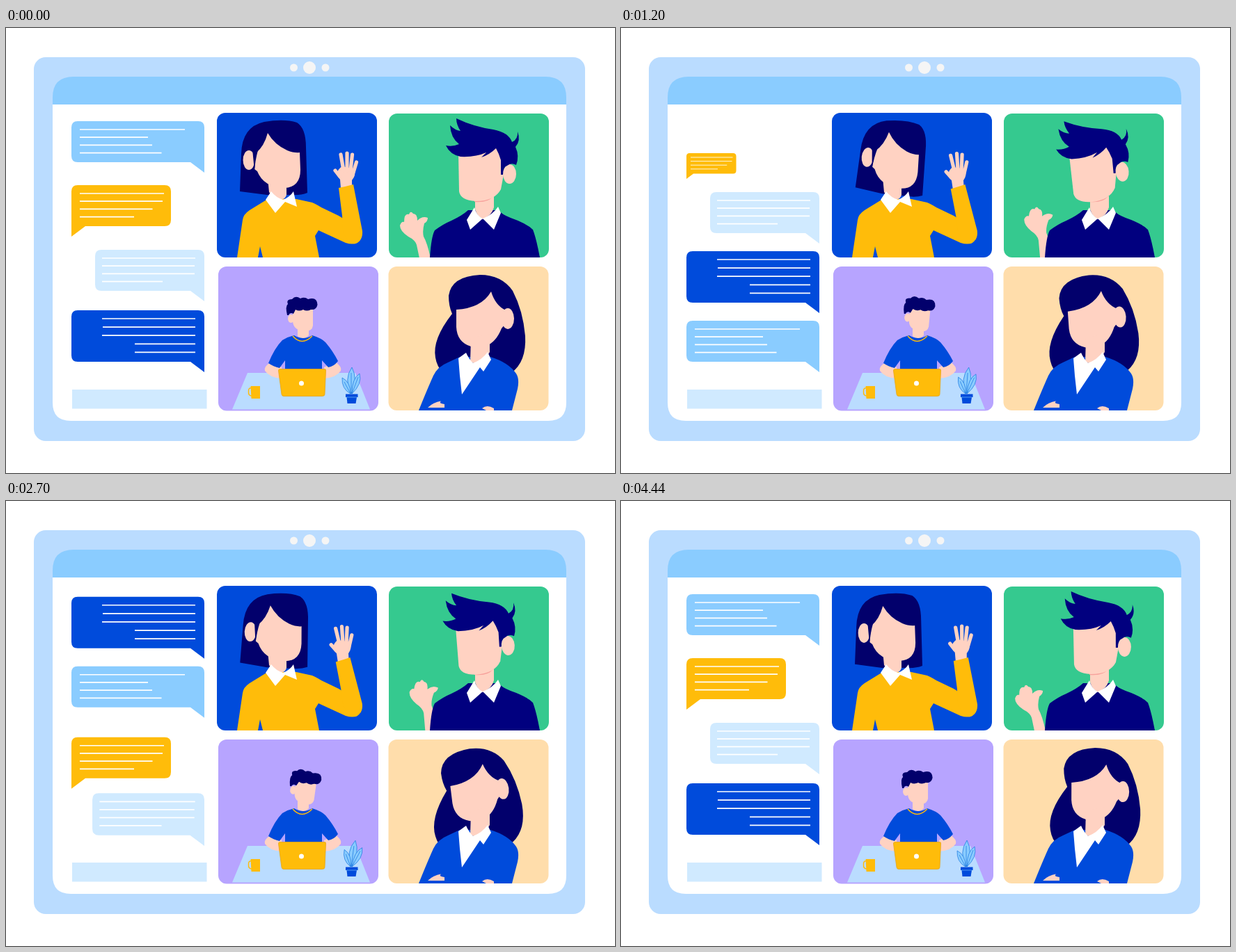
An HTML page that plays this animation: 875x640 px, repeating every 4500 ms.

```html
<!DOCTYPE html>
<html lang="en">
<head>
<meta charset="utf-8">
<title>Video call</title>
<style>
  html, body { margin: 0; width: 100%; height: 100%; overflow: hidden; background: #fff; }
  svg { display: block; width: 875px; height: 640px; }
  .skin { fill: #ffd2c2; }
  .hair { fill: #02006c; }
  .navy { fill: #01007f; }
  .blue { fill: #004bdb; }
  .gold { fill: #ffbc0a; }
  .sky { fill: #8accff; }
  .ice { fill: #badcff; }
  .pale { fill: #d0eaff; }
  .white { fill: #fff; }
  .line { fill: none; }
</style>
</head>
<body>
<svg viewBox="0 0 875 640">
  <clipPath id="topRow"><path d="M0 0H875V330H0Z"/></clipPath>

  <!-- Device -->
  <rect class="ice" x="40" y="42" width="792" height="552" rx="17"/>
  <path class="white" d="M67 109H805V539Q805 565 779 565H93Q67 565 67 539Z"/>
  <path class="sky" d="M67 110V100Q67 70 97 70H775Q805 70 805 100V110Z"/>
  <g fill="#f5f5f5"><circle cx="413.5" cy="57" r="5.5"/><circle cx="436" cy="57" r="9"/><circle cx="459" cy="57" r="5.5"/></g>
  <rect class="pale" x="95" y="520" width="193.5" height="27.5"/>
  <g id="chat"></g>

  <!-- Waving woman -->
  <rect class="blue" x="303" y="122" width="230" height="208" rx="12"/>
  <g id="waver">
    <path class="hair" d="M336 235L338 181Q339 142 371 135Q400 130 418 136Q431 144 431 172L433 237Q423 241 408 240L375 240Z"/>
    <path class="skin" d="M376 151Q386 168 404 176Q414 180 422 179L423 204Q423 229 400 230Q370 229 361 206L357 203L359 180Q371 170 376 151Z"/>
    <ellipse class="skin" cx="349" cy="190" rx="8.5" ry="14"/>
    <path class="hair" d="M354 174L362 176Q358 190 357 206Z"/>
  </g>
  <path class="gold" d="M332 330L340 276Q341 268 350 262L376 246H417L440 251Q447 254 453 258L478 270L510 290Q513 302 505 309Q498 312 488 309L449 291L444 299L450 330H369L365 314L362 330Z"/>
  <path class="skin" d="M376 215H403V240Q401 247 394 247Q383 244 378 236Z"/>
  <path class="white" d="M373 247L381 235Q388 244 398 247Q408 243 413 235L418 257L401 250L387 266Z"/>
  <g id="wave">
    <path class="skin" d="M481 230L480 218L475 211Q477 202 483 199L501 203Q503 212 497 219V228Z"/>
    <path class="line" stroke="#ffd2c2" stroke-width="5.2" stroke-linecap="round" d="M473 205L480 214M481 182L485 205M490 180V205M497.500 182L495 205M503.500 193L499 208"/>
    <path class="gold" d="M478 230Q488 228 499 225L512 292Q513 306 502 310Q490 312 484 290L483 270Z"/>
  </g>

  <!-- Man in navy -->
  <rect fill="#35c98f" x="550" y="123" width="230" height="207" rx="12"/>
  <g clip-path="url(#topRow)">
    <path id="thumb" class="skin" d="M598 350L590 312Q588 305 578 300Q566 292 566 284Q568 278 572 279Q572 266 579 268Q581 262 585 267Q591 267 591 277Q598 270 606 273Q606 278 601 281Q598 292 600 300Q607 312 614 350Z"/>
  </g>
  <path class="navy" d="M609 330Q611 300 616 291Q628 282 640 277Q655 270 664 262H708Q712 268 725 273Q748 281 757 290Q762 303 767 330Z"/>
  <path class="skin" d="M674 242H701V258Q698 270 685 275Q676 270 674 260Z"/>
  <path class="white" d="M662 276L673 258Q676 270 685 274L667 290ZM685 274Q700 268 707 257L711 266L701 290Z"/>
  <path fill="#f7a09b" d="M673 245L700 242Q692 252 673 250Z"/>
  <g id="nodder">
    <path class="skin" d="M650 180L651 235Q653 248 675 249Q702 249 711 232L716 205L708 172Z"/>
    <ellipse class="skin" cx="723.5" cy="210" rx="9.500" ry="14"/>
    <path class="navy" d="M647 130Q672 142 700 146Q722 150 727 164Q736 160 735 149Q740 162 732 171Q738 184 733 197Q726 193 720 198Q714 200 714 211H711V190Q708 180 704 173Q695 182 683 186L690 179Q675 186 653 185Q638 182 632 169Q642 171 651 167Q639 158 638 140Q645 147 653 148Q647 139 647 130Z"/>
  </g>

  <!-- Man at the desk -->
  <rect fill="#b7a4ff" x="305" y="343" width="230" height="207.500" rx="12"/>
  <path class="ice" d="M347 496H502L523 548.500H325Z"/>
  <g class="skin"><path d="M380 481Q370 487 372 493Q379 503 396 504V488Z"/><path d="M473 480Q483 487 481 493Q474 503 457 504V488Z"/></g>
  <path class="skin" d="M419 428H435V442Q427 450 419 443Z"/>
  <path class="blue" d="M414 442Q427 450 440 442Q453 446 459 452Q470 465 477 479Q471 487 463 488L454 478V491H401V478L393 489Q384 487 377 482Q386 460 397 449Q405 444 414 442Z"/>
  <path class="line" stroke="#ffbc0a" stroke-width="1.500" d="M412 443Q425 458 440 443"/>
  <g id="worker">
    <path class="skin" d="M412 402H441V428Q440 436 430 436Q412 435 412 421Z"/>
    <ellipse class="skin" cx="409.500" cy="418" rx="4.500" ry="6"/>
    <path class="hair" d="M404 413Q401 400 405 397Q402 390 411 390Q416 384 423 389Q429 386 434 390Q447 386 447.500 398Q446 406 438 405Q432 408 427 405Q421 408 416 405L413 411Q408 408 406 413Z"/>
  </g>
  <path class="gold" stroke="#e5a51c" stroke-width=".8" d="M394 490.500H457Q460 490 459.500 493L458 527Q458 529.500 454 529.500H399Q396.500 529.500 396 527L391.500 493Q391 490.500 394 490.500Z"/>
  <circle class="white" cx="424.500" cy="511" r="3.500"/>
  <path class="gold" d="M351.500 515H365V533H352.500Z"/>
  <path class="line" stroke="#ffbc0a" stroke-width="1.500" d="M353 518Q348 517 348.500 523Q348 529 353 529"/>
  <path id="steam" class="line" stroke="#0a45c0" stroke-width="2.500" pathLength="26" d="M359 517C354 510 364 508 359 502C355 498 357 494 361 491"/>
  <g id="leaves" class="sky" stroke="#1b78df" stroke-width=".7">
    <path d="M496 526Q485 505 497 488Q506 505 496 526V496"/>
    <path d="M497 526Q497 504 508 497Q512 512 497 526L506 502"/>
    <path d="M495 526Q482 519 483 503Q495 509 495 526L486 509"/>
  </g>
  <path class="blue" d="M488 526.500H505.500V531H504L502.500 540H490.500L489.500 531H488Z"/>
  <path class="line" stroke="#8accff" stroke-width=".6" d="M489 531H504"/>

  <!-- Woman with long hair -->
  <rect fill="#ffddab" x="549.500" y="343" width="230" height="207" rx="12"/>
  <g id="listener">
    <path class="hair" d="M681 355Q640 357 636 385Q636 400 641 411Q612 448 617 474Q619 487 628 496H726Q748 480 746 443Q743 407 728 378Q712 355 681 355Z"/>
    <path class="skin" d="M647 405Q683 403 697 379Q703 399 718 406V425L712 432Q704 452 690 457Q680 461 668 458Q648 452 647 430Z"/>
    <ellipse class="skin" cx="721" cy="418" rx="9" ry="15"/>
  </g>
  <path class="blue" d="M593 550Q605 520 614 500Q620 487 635 481L652 473H696Q722 481 733 497Q738 505 735 519L727 550Z"/>
  <path class="skin" d="M668 445L695 440V466L684 484L667 481Z"/>
  <path class="white" d="M650 475L661 467Q665 476 671 482Q684 477 692 466L697 477L686 494L681 488L655 527L652 500Z"/>
  <path class="skin" d="M606 546Q614 538 625 536.500Q621 540 630 541V546ZM684 547Q691 541 701 547V550H690Z"/>
</svg>

<script>
const LOOP = 4500, STEP = 60;
const byId = id => document.getElementById(id);
const clamp = x => Math.min(1, Math.max(0, x));

// Bubbles: tips holds the tail height at rest in each phase, pop the phase of re-entry.
const starts = [0, 1140, 2250, 3360, LOOP];
const bubbles = [
  { cls: 'sky', x: 285, w: -191, h: 59, pop: 0, tips: [208, 495, 394, 310],
    lines: [[106, 257], [106, 204], [106, 210], [106, 223.5]] },
  { cls: 'gold', x: 94, w: 143, h: 59, pop: 1, tips: [300, 217, 496, 412],
    lines: [[106, 227], [106, 225], [106, 210.5], [106, 184]] },
  { cls: 'pale', x: 285, w: -157, h: 59, pop: 2, tips: [393, 310, 209, 496],
    lines: [[138, 272], [138, 271], [138, 271], [138, 225]] },
  { cls: 'blue', x: 285, w: -191, h: 74, pop: 3, tips: [495, 410, 309, 225],
    lines: [[138, 272], [139, 272], [138, 272], [185, 272], [185, 272]] },
];

function bubbleMarkup({ cls, x, w, h, lines }) {
  const side = Math.sign(w), top = -15 - h, pitch = h > 60 ? 12.1 : 11.2;
  const body = `M0 0V${top + 9}Q0 ${top} ${9 * side} ${top}H${w - 9 * side}Q${w} ${top} ${w} ${top + 9}` +
    `V-24Q${w} -15 ${w - 9 * side} -15H${20 * side}Z`;
  const text = lines.map(([a, b], i) => `M${a - x} ${top + 12 + i * pitch}H${b - x}`).join('');
  return `<g><path class="${cls}" d="${body}"/><path stroke="#fff" stroke-width="1.7" d="${text}"/></g>`;
}
byId('chat').innerHTML = bubbles.map(bubbleMarkup).join('');

function popScale(u) {
  const rise = clamp((u - 95) / 415);
  return rise < 1 ? 1.037 * (1 - (1 - rise) ** 2.3) : 1.037 - 0.037 * clamp((u - 510) / 90);
}

function drawChat(t) {
  const phase = starts.findIndex((s, i) => t < starts[i + 1]);
  const u = t - starts[phase];
  const slide = 1 - (1 - clamp((u - 95) / 490)) ** 3;
  bubbles.forEach(({ x, tips, pop }, i) => {
    const from = tips[phase], to = tips[(phase + 1) % 4];
    let y = from + (to - from) * slide, scale = 1;
    if (pop === phase) {
      const leaving = u < 120;
      y = leaving ? from : to;
      scale = leaving ? 1 - u / 120 : popScale(u);
    }
    byId('chat').children[i].setAttribute('transform', `translate(${x} ${y}) scale(${scale})`);
  });
}

// Swaying parts: pivot and angles at the shared key times.
const keys = [0, 600, 1100, 1560, 2040, 2700, 3250, 3720, LOOP];
const sways = [
  ['waver', 393, 240, [0, 3.2, 5.7, 4.5, 0.2, 2.5, 5.5, 5.7]],
  ['nodder', 688, 245, [0, -3.5, -5.5, -3.5, 1.2, -3.5, -5.8, -6]],
  ['thumb', 650, 392, [0, 8, 7.5, 3.2, 0, 7, 8, 7]],
  ['worker', 427, 440, [0, 4, 5.5, 5, 4, 8, 7.5, 6.5]],
  ['listener', 684, 478, [0, -5.5, -4.5, -2.5, -1.8, -7, -4, -0.5]],
  ['leaves', 497, 526, [0, 9, 5, 1, 3, 7.5, 9, 9]],
];

function spline(t, values) {
  const n = values.length;
  const i = keys.findIndex((k, j) => t < keys[j + 1]);
  const x = (t - keys[i]) / (keys[i + 1] - keys[i]);
  const [a, b, c, d] = [-1, 0, 1, 2].map(o => values[(i + o + n) % n]);
  return b + x / 2 * (c - a + x * (2 * a - 5 * b + 4 * c - d + x * (3 * (b - c) + d - a)));
}

const rotate = (id, angle, cx, cy) =>
  byId(id).setAttribute('transform', `rotate(${angle} ${cx} ${cy})`);

function draw(t) {
  drawChat(t);
  for (const [id, cx, cy, angles] of sways) rotate(id, spline(t, angles), cx, cy);
  const beat = t / 1500 % 1;
  rotate('wave', -5.4 * (1 - Math.cos(beat * 2 * Math.PI)), 497, 296);
  const head = 26 * clamp((beat - 0.2) / 0.3), tail = 26 * clamp((beat - 0.42) / 0.28);
  byId('steam').setAttribute('stroke-dasharray', `0 ${tail} ${head - tail} 100`);
  byId('steam').setAttribute('visibility', head > tail ? 'visible' : 'hidden');
}

function tick() {
  draw(Math.floor(performance.now() % LOOP / STEP) * STEP);
  requestAnimationFrame(tick);
}
tick();
</script>
</body>
</html>
```
